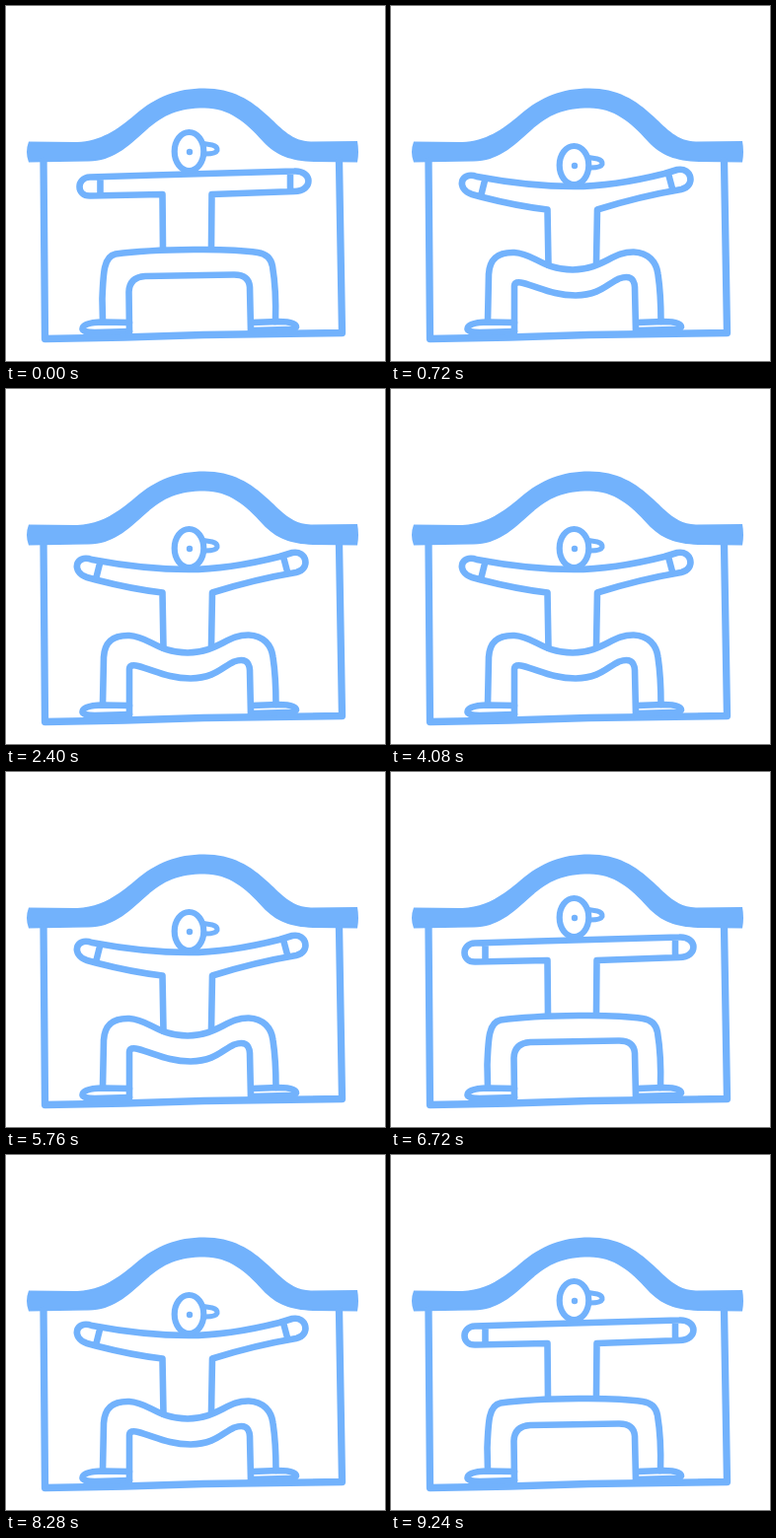
Recreate the animation shown at these times as an HTML page. Size 384x360 px, loop 9480 ms.

```html
<!DOCTYPE html>
<html lang="en">
<head>
<meta charset="utf-8">
<title>Squats</title>
<style>
html, body { margin: 0; width: 100%; height: 100%; overflow: hidden; background: #fff; }
svg { display: block; }
.line { fill: none; stroke: #72b2fc; stroke-width: 6.6; stroke-linecap: round; stroke-linejoin: round; }
.solid { fill: #72b2fc; stroke: none; }
</style>
</head>
<body>
<svg width="384" height="360" viewBox="0 0 384 360" class="line">
  <!-- roof -->
  <path class="solid" d="M23 137.5L72 138C96 137 112 126 131 110C152 92 173 83.500 201 83.500C229 83.500 248 95 266 112C280 125 290 137 309 137.500L356 137Q358 148 356 158.500L312 158C288 157 274 152 260 137C243 118 226 103.500 201 103.500C175 103.500 160 110 142 126C122 144 108 157 84 157.500L23 158.500Q19 148 23 137.500Z"/>
  <!-- walls and floor -->
  <path d="M38 157L39.500 337.500L120 336L200 333.500L340.500 331.500L337.500 157" stroke-width="7.300"/>
  <!-- feet -->
  <path d="M125 321L98 320.500Q77.500 321 77.500 327.500Q78 331 90 331L125 330M249 321L276 320Q294 320 294 325.500Q293 328 284 328L249 329"/>

  <g id="up">
    <path d="M159 246L158.500 191L85 192.500C71 192.500 71 174 85 173.500L150 171.500L292 167.500C311 166.500 311.500 188 292 188L208.500 191L208 245M95.500 174V192M288 168.500V187"/>
    <path d="M98 320L97.500 297C98.500 270 99 254 111 251.500Q140 247.500 190 247Q232 246.500 255 250Q268 252 270 264Q274 288 273 320"/>
    <path d="M125 330L124.500 290Q125 275 141 274L230 272.500Q246 272 247 285L248 330"/>
  </g>

  <g id="down">
    <path d="M159.500 263L158.500 206.500Q128 203 91 193.500L82 191C66 186 70 167 87 173Q140 183 185 183Q225 183 277 170L290 166C305 163 309 183 294 186Q252 193 209 206.500L208 261M95 177L91 193M281 170L285.500 187"/>
    <path d="M98 320L99 272C100 255 110 249.500 125 250C145 251 153 267 184 267.500C215 267 224 249 246 249.500C261 250 269 260 270.500 272Q273.500 292 273.500 320"/>
    <path d="M125 330L125 284Q125.500 278.500 134 281C152 286 165 293.500 187 293.500C212 293 219 282 231 276.500Q246 271 247 285L248 330"/>
  </g>

  <g id="head">
    <path d="M200 139.500L209 141Q214.500 142.500 214 146.500Q212.500 150 202 150" stroke-width="5"/>
    <ellipse cx="185.500" cy="147.500" rx="14.800" ry="19.500" fill="#fff" stroke-width="6.200"/>
    <circle class="solid" cx="186" cy="148" r="3.200"/>
  </g>
</svg>
<script>
const [up, down, head] = ["up", "down", "head"].map(id => document.getElementById(id));
const LOOP = 9480, RESTART = 7560, CYCLE = 1680, STAND = 720;

// The squat cycle starts over once, partway through the loop.
function isSquatting(t) {
  return t % RESTART % CYCLE >= STAND;
}

function draw() {
  const squat = isSquatting(performance.now() % LOOP);
  up.style.display = squat ? "none" : "";
  down.style.display = squat ? "" : "none";
  head.setAttribute("transform", `translate(0 ${squat ? 14 : 0})`);
  requestAnimationFrame(draw);
}
draw();
</script>
</body>
</html>
```
